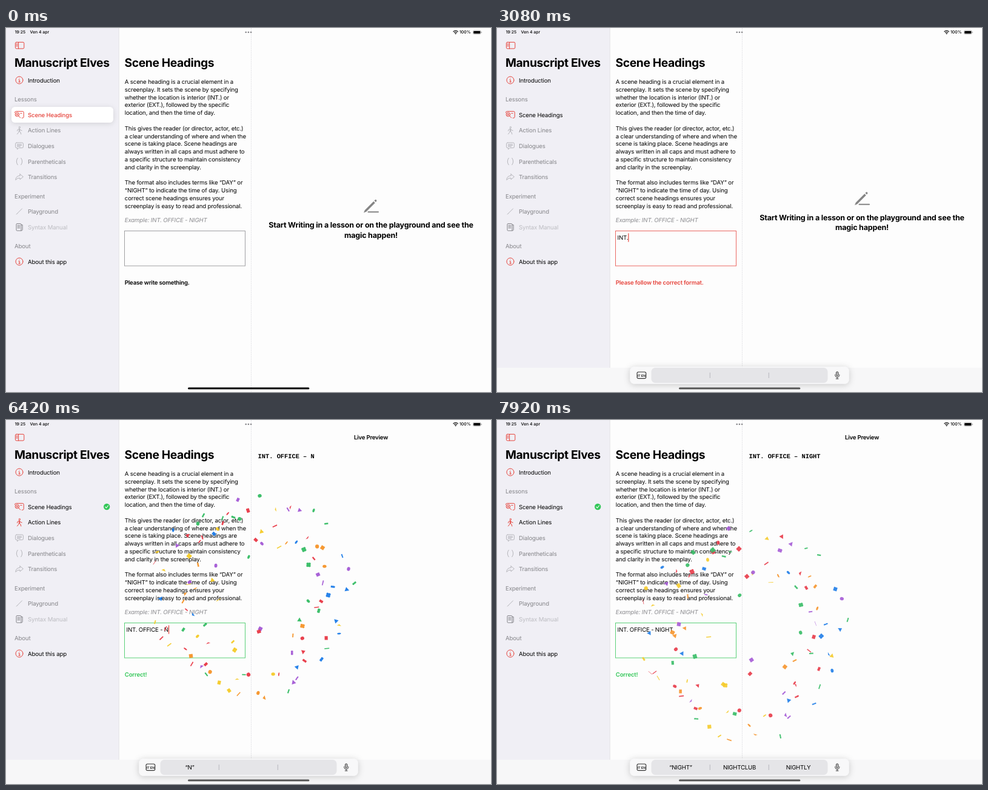
Write an HTML page with a canvas that moves like this. It is 800x600 px and loops after 8000 ms.

```html
<!DOCTYPE html>
<html lang="en">
<head>
<meta charset="utf-8">
<title>Screenplay lesson</title>
<style>
  html, body { margin: 0; width: 100%; height: 100%; overflow: hidden; background: #fdfdfd; }
  svg, canvas { position: absolute; left: 0; top: 0; width: 800px; height: 600px; }
  text { font-family: Inter, "Liberation Sans", sans-serif; font-size: 9.65px; letter-spacing: -.0155em; fill: currentColor; white-space: pre; text-rendering: geometricPrecision; }
  .title { font-size: 19.3px; font-weight: 700; letter-spacing: -.0205em; }
  .semi, .caps { letter-spacing: -.0214em; }
  .semi { font-weight: 600; }
  .small { font-size: 6.9px; font-weight: 500; letter-spacing: 0; }
  .call { font-size: 12.5px; font-weight: 700; text-anchor: middle; letter-spacing: -.0145em; }
  .mid { text-anchor: middle; }
  .script { font: 700 10.35px "Liberation Mono", "DejaVu Sans Mono", monospace; letter-spacing: 0; }
  .icon { fill: none; stroke: currentColor; stroke-linecap: round; stroke-linejoin: round; }
</style>
</head>
<body>
<svg viewBox="0 0 800 600">
  <defs>
    <filter id="soft" x="-20%" y="-100%" width="140%" height="300%">
      <feDropShadow dx="0" dy="1.5" stdDeviation="4" flood-opacity=".13"/>
    </filter>
    <filter id="wide" x="-20%" y="-100%" width="140%" height="300%">
      <feDropShadow dx="0" dy="1.5" stdDeviation="5.5" flood-opacity=".2"/>
    </filter>
  </defs>
  <rect width="800" height="600" fill="#fdfdfd"/>
  <rect width="186" height="600" fill="#f0eff5"/>
  <path d="M186.3 0V600" stroke="#dcdce0" stroke-width=".7"/>
  <path d="M404.5 0V600" stroke="#dedee2" stroke-width=".8" stroke-dasharray="2 1"/>
  <rect id="pill" x="9" y="130" width="168" height="26" rx="6" fill="#fff" filter="url(#soft)"/>
  <g id="page"></g>

  <rect id="box" x="195.5" y="334.5" width="199" height="57.6" fill="none" stroke-opacity=".8"/>
  <g id="entry"></g>
  <rect id="caret" y="338.4" width="1.2" height="14.2" fill="#e6443c"/>

  <g id="invite" color="#000">
    <g color="#858585">
      <path d="M590 304.5L591.8 300.2L606.3 285.7L608.8 288.2L594.3 302.7Z M607.4 284.6L608.8 283.2Q610 282.4 611 283.4Q611.9 284.6 611 285.7L609.9 287.1Z" fill="currentColor"/>
      <rect x="596.5" y="302.2" width="18.5" height="2" rx="1" fill="currentColor"/>
    </g>
  </g>
  <g id="preview"></g>

  <g id="done">
    <circle cx="166.2" cy="143" r="5.2" fill="#34c759"/>
    <path d="M163.8 143.2L165.5 145L168.6 141" fill="none" stroke="#fff" stroke-width="1.1" stroke-linecap="round" stroke-linejoin="round"/>
  </g>

  <rect id="floor" width="800" height="44" fill="#f7f7f8"/>
  <g id="bar">
    <rect x="219.5" y="558.5" width="361" height="28" rx="7" fill="#f8f8f9" filter="url(#wide)"/>
    <rect x="254.5" y="560" width="291" height="25" rx="6.5" fill="#e5e5e8"/>
    <path d="M351.3 568V577M448.3 568V577" stroke="#b4b4b8" stroke-width=".9"/>
    <rect x="231" y="567" width="14.8" height="10.6" rx="2.4" fill="none" stroke="#333" stroke-width="1.1"/>
    <text x="238.4" y="574.5" style="font:700 5.4px 'Liberation Sans',sans-serif;letter-spacing:-.02em;text-anchor:middle;fill:#222">IT EN</text>
    <rect x="559.4" y="566.6" width="3.6" height="7" rx="1.8" fill="#bbb" stroke="#333" stroke-width=".9"/>
    <path class="icon" d="M557.6 571.5V572.5Q557.8 575.6 561.2 575.6Q564.6 575.6 564.8 572.5V571.5M561.2 575.8V578M559.2 578.2H563.2" stroke-width=".9" color="#333"/>
    <g id="hints"></g>
  </g>
  <rect id="home" x="300" y="592.4" width="200.4" height="3" rx="1.5"/>
</svg>
<canvas id="party" width="800" height="600"></canvas>

<script>
const LOOP = 8000, RED = '#e6443c', GREEN = '#34c759', GRAY = '#858589', PALE = '#b6b6bb';
const $ = id => document.getElementById(id);

function add(parent, tag, attrs, label) {
  const el = document.createElementNS('http://www.w3.org/2000/svg', tag);
  for (const k in attrs) el.setAttribute(k, attrs[k]);
  if (label !== undefined) el.textContent = label;
  return parent.appendChild(el);
}
const put = (parent, x, y, label, cls = '', color = '#000') =>
  add(parent, 'text', { x, y, class: cls, color }, label);
const page = $('page');

// Icons are drawn around their own centre.
const ICONS = {
  info: 'M6 0A6 6 0 1 1 -6 0A6 6 0 1 1 6 0M-1 -.6H.2V3M-1.2 3H1.4M0 -2.9V-2.8',
  scene: 'M-.3 -.5A3.3 3.3 0 1 1 -6.9 -.5A3.3 3.3 0 1 1 -.3 -.5M-1.3 2L1.8 5M-7.6 -3.6Q-7.4 -5.6 -5.4 -5.6H5.3Q7.2 -5.6 7.2 -3.8V3.5Q7.2 5.3 5.3 5.3H4.2M-5 -1.3H-2.3M-5 .4H-2.3M1.8 -2.4H4',
  walk: 'M1.6 -5A1.2 1.2 0 1 1 -.8 -5A1.2 1.2 0 1 1 1.6 -5M0 -2.6L-.5 1.2L2 3.3L2.8 6.3M-.5 1.2L-1.4 3.6L-3.6 6.2M0 -2.6L-2.7 -1.3L-3.4 1M0 -2.6L2 -.3L4.2 .4M.8 -2L.6 1.6',
  bubble: 'M-4.6 -5.2H4.6Q6.4 -5.2 6.4 -3.4V1.6Q6.4 3.4 4.6 3.4H-.8L-3.4 5.8V3.4H-4.6Q-6.4 3.4 -6.4 1.6V-3.4Q-6.4 -5.2 -4.6 -5.2M-3.6 -2.4H3.6M-3.6 -.6H3.6M-3.6 1.2H1.5',
  paren: 'M-2.8 -5.6Q-6.8 0 -2.8 5.6M2.8 -5.6Q6.8 0 2.8 5.6',
  turn: 'M1 -4.8L6.4 -.2L1 4.2V1.7Q-3.6 1.5 -6.2 5Q-6 -1.6 1 -2.2Z',
  pencil: 'M-4.8 4.8L-3.6 3.6M-3.6 3.6L4.4 -4.4',
  book: 'M-3.8 -5.8H1.8Q3 -5.8 3 -4.6V5.8H-3.8Q-5 5.8 -5 4.6V-4.6Q-5 -5.8 -3.8 -5.8M3 -3.8H5.2V4.4Q5.2 5.8 3 5.8M-3 -3H1M-3 -.8H1M-3 1.4H1'
};

function row(y, icon, label, iconColor, color) {
  return {
    icon: add(page, 'path', { d: ICONS[icon], class: 'icon', transform: `translate(22 ${y})`, color: iconColor, 'stroke-width': 1 }),
    label: put(page, 36, y + 3.5, label, '', color)
  };
}

function statusBar() {
  put(page, 14.4, 9.3, '19:25', 'small');
  put(page, 39.4, 9.3, 'Ven 4 apr', 'small');
  put(page, 748, 9.3, '100%', 'small');
  [395.7, 399.9, 404.1].forEach(cx => add(page, 'circle', { cx, cy: 7, r: 1.35, fill: '#88888c' }));
  add(page, 'path', { class: 'icon', d: 'M738 5.8Q741.6 2.8 745.2 5.8M739.5 7.6Q741.6 5.9 743.7 7.6', 'stroke-width': 1.2 });
  add(page, 'circle', { cx: 741.6, cy: 9.2, r: 1 });
  add(page, 'rect', { x: 770.3, y: 4, width: 13, height: 6.2, rx: 1.9, fill: 'none', stroke: '#999', 'stroke-width': .6 });
  add(page, 'rect', { x: 771.2, y: 4.9, width: 11.2, height: 4.4, rx: 1.1 });
  add(page, 'rect', { x: 784, y: 6, width: .9, height: 2.2, rx: .4, fill: '#999' });
}

statusBar();
add(page, 'path', { class: 'icon', color: RED, d: 'M17.2 23.4H28Q29.8 23.4 29.8 25.2V32.2Q29.8 34 28 34H17.2Q15.4 34 15.4 32.2V25.2Q15.4 23.4 17.2 23.4M20.6 23.4V34M17 26H19M17 28H19M17 30H19', 'stroke-width': 1 });
put(page, 14, 64.4, 'Manuscript Elves', 'title');
put(page, 195.6, 64.4, 'Scene Headings', 'title');
[[117.5, 'Lessons'], [277, 'Experiment'], [359.5, 'About']].forEach(([y, s]) => put(page, 14, y + 3.5, s, '', GRAY));

row(86, 'info', 'Introduction', RED, '#000');
const scene = row(143, 'scene', 'Scene Headings', RED, RED);
const action = row(168.7, 'walk', 'Action Lines', PALE, GRAY);
row(194.2, 'bubble', 'Dialogues', PALE, GRAY);
row(220, 'paren', 'Parentheticals', PALE, GRAY);
row(245.5, 'turn', 'Transitions', PALE, GRAY);
row(302.3, 'pencil', 'Playground', PALE, GRAY);
row(328.3, 'book', 'Syntax Manual', '#85858a', '#bdbdc2');
row(385, 'info', 'About this app', RED, '#000');

[
  'A scene heading is a crucial element in a',
  'screenplay. It sets the scene by specifying',
  'whether the location is interior (INT.) or',
  'exterior (EXT.), followed by the specific',
  'location, and then the time of day.', '',
  'This gives the reader (or director, actor, etc.)',
  'a clear understanding of where and when the',
  'scene is taking place. Scene headings are',
  'always written in all caps and must adhere to',
  'a specific structure to maintain consistency',
  'and clarity in the screenplay.', '',
  'The format also includes terms like “DAY” or',
  '“NIGHT” to indicate the time of day. Using',
  'correct scene headings ensures your',
  'screenplay is easy to read and professional.'
].forEach((s, i) => put(page, 195.8, 92 + i * 12.8, s));
put(page, 195.8, 320, 'Example: INT. OFFICE - NIGHT', '', '#8a8a8e').setAttribute('font-style', 'italic');

const verdict = put(page, 195.8, 422.7, '', 'semi');
const typed = put($('entry'), 198.6, 348.8, '', 'caps');
put($('invite'), 602, 329, 'Start Writing in a lesson or on the playground and see the', 'call');
put($('invite'), 602, 345.5, 'magic happen!', 'call');
put($('preview'), 602, 32, 'Live Preview', 'semi mid');
const script = put($('preview'), 415.6, 62.8, '', 'script');
const hintSlots = [303, 400, 497].map(x => put($('hints'), x, 575.6, '', 'caps mid'));

// Typing
const LINE = 'INT. OFFICE - NIGHT';
const KEYS = [2420, 2750, 3000, 3080, 3500, 4000, 4250, 4500, 4670, 4830, 5080, 5330, 5750, 5920, 6250, 6500, 6670, 6830, 7080];
const HINTS = [
  [0, ''], [2500, '“I”'], [2830, '“IN” INTO INDEED'], [3000, '“INT” INTO INTERNET'], [3080, ''],
  [4000, '“O”'], [4250, '“OF” OFTEN OFF'], [4500, '“OFF” OFFER OF'], [4920, '“OFFIC” OFFICE OFFICERS'],
  [5330, ''], [6330, '“N”'], [6580, '“NI” NICE NIGHT'], [6920, '“NIGH” NIGHT NIGHTCLUB'],
  [7170, '“NIGHT” NIGHTCLUB NIGHTLY']
];
const FOCUS = 250, RISE = 830, WIN = 5920;
const clamp = v => Math.max(0, Math.min(1, v));
const show = (el, on) => { el.style.display = on ? '' : 'none'; };
const tint = (el, color) => el.setAttribute('color', color);

function caretAlpha(age) {
  const p = age % 1000;
  return p >= 880 ? 1 : 1 - clamp((p - 540) / 170);
}

// Confetti
const pen = $('party').getContext('2d');
const COLORS = ['#e83a48', '#e83a48', '#f6952c', '#f5cb2b', '#37bd66', '#1f7de8', '#a55bd6'];
let seed = 41;
const rand = () => (seed = (seed * 16807) % 2147483647) / 2147483647;
const pieces = Array.from({ length: 112 }, (_, i) => ({
  angle: (i + rand()) / 112 * Math.PI * 2,
  reach: 172 * Math.pow(.02 + .97 * rand(), .36),
  time: 330 + 250 * rand(),
  drop: .8 + .4 * rand(),
  color: COLORS[Math.floor(rand() * COLORS.length)],
  shape: Math.floor(rand() * 9) % 5,
  roll: rand() * 6.28, flip: rand() * 6.28,
  rollRate: (rand() - .5) * .004, flipRate: .001 + rand() * .004
}));

function outline(shape) {
  pen.beginPath();
  if (shape === 0) pen.arc(0, 0, 3.2, 0, 7);
  else if (shape === 1) pen.rect(-3.1, -3.1, 6.2, 6.2);
  else if (shape === 2) { pen.moveTo(-3.7, 3.2); pen.lineTo(3.7, 3.2); pen.lineTo(0, -3.6); }
  else if (shape === 4) pen.rect(-4, -.9, 8, 1.8);
  else for (const [x, y] of [[-1.6, -1.6], [1.6, -1.6], [1.6, 1.6], [-1.6, 1.6]]) {
    pen.moveTo(x, y); pen.arc(x, y, 2.1, 0, 7);
  }
  pen.fill();
}

function confetti(age) {
  pen.clearRect(0, 0, 800, 600);
  if (age <= 0) return;
  pen.globalAlpha = 1 - .1 * clamp(age / 1500);
  for (const p of pieces) {
    const out = p.reach * (1 - Math.pow(1 - clamp(age / p.time), 3)) * (1 + age * 1.6e-5);
    const fall = 1.6e-5 * p.drop * age * age;
    pen.save();
    pen.translate(407 + Math.cos(p.angle) * out, 284 + Math.sin(p.angle) * out + fall);
    pen.rotate(p.roll + p.rollRate * age);
    pen.scale(1, Math.max(.3, Math.abs(Math.cos(p.flip + p.flipRate * age))));
    pen.fillStyle = p.color;
    outline(p.shape);
    pen.restore();
  }
}

function draw(t) {
  const tick = Math.floor((t + 4) * .012) / .012;   // motion advances at 12 steps a second
  const count = KEYS.filter(k => k <= t).length;
  const typing = count > 0, won = t >= WIN;

  show($('pill'), !typing);
  tint(scene.label, t < FOCUS ? RED : '#000');
  tint(scene.icon, t < FOCUS || typing ? RED : '#000');
  scene.label.style.fontWeight = typing ? 400 : 500;
  tint(action.label, won ? '#000' : GRAY);
  tint(action.icon, won ? RED : PALE);
  show($('done'), won);
  show($('invite'), !won);
  show($('preview'), won);

  const text = LINE.slice(0, count).replace(/ /g, '\u00a0');
  typed.textContent = text;
  script.textContent = text.replace('-', '–');
  const caret = $('caret');
  caret.setAttribute('x', 198 + (typing ? typed.getComputedTextLength() + .6 : 0));
  caret.style.opacity = t < FOCUS ? 0 : caretAlpha(Math.max(0, t - (typing ? KEYS[count - 1] : 290)));

  const mood = won ? [GREEN, 'Correct!'] : typing ? [RED, 'Please follow the correct format.'] : ['#000', 'Please write something.'];
  tint(verdict, mood[0]);
  verdict.textContent = mood[1];
  $('box').setAttribute('stroke', typing ? mood[0] : '#8a8a8e');

  const p = 1 - Math.pow(1 - clamp((tick - RISE + 60) / 620), 3);
  $('bar').setAttribute('transform', `translate(0 ${(1 - p) * 50})`);
  show($('bar'), p > 0);
  $('floor').setAttribute('y', 600 - 40 * p);
  $('invite').setAttribute('transform', `translate(0 ${-12.5 * p})`);
  const shade = Math.round(85 * p);
  $('home').setAttribute('fill', `rgb(${shade},${shade},${shade})`);

  const words = HINTS.filter(h => h[0] <= t).pop()[1].split(' ');
  hintSlots.forEach((slot, i) => { slot.textContent = words[i] || ''; });

  confetti(tick - WIN + 10);
}

const start = performance.now();
function loop() {
  draw((performance.now() - start) % LOOP);
  requestAnimationFrame(loop);
}
loop();
</script>
</body>
</html>
```
